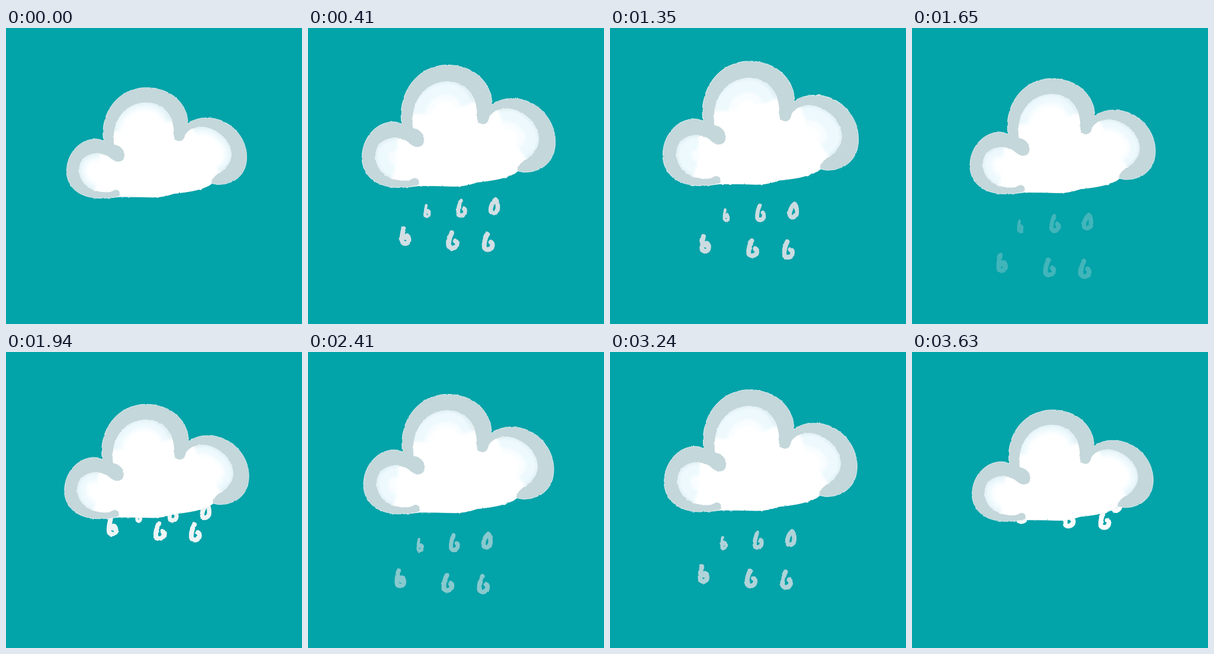
These frames come from a looping animation (500 by 500 pixels, 3.73 s). An HTML page:

```html
<!DOCTYPE html>
<html lang="en">
<head>
<meta charset="utf-8">
<title>Rain cloud</title>
<style>
  html, body { margin: 0; width: 100%; height: 100%; overflow: hidden; background: #02a3a9; }
  svg { display: block; width: 100vw; height: 100vh; }
  .line { fill: none; stroke-linecap: round; stroke-linejoin: round; }
  .shade { fill: none; stroke: #eaf8fd; }
</style>
</head>
<body>
<svg viewBox="0 0 500 500">
  <defs>
    <filter id="rough" filterUnits="userSpaceOnUse" x="0" y="0" width="500" height="500" color-interpolation-filters="sRGB">
      <feTurbulence type="fractalNoise" baseFrequency=".13" numOctaves="2" seed="4"/>
      <feDisplacementMap in="SourceGraphic" scale="3" xChannelSelector="R" yChannelSelector="G"/>
    </filter>
    <filter id="soft" filterUnits="userSpaceOnUse" x="0" y="0" width="500" height="500">
      <feGaussianBlur stdDeviation="2.2"/>
    </filter>
    <path id="outline" d="M89 215C88 181 112 152 143 152Q151 152 157 156C149 103 184 55 235 55
      C279 55 311 83 312 123Q326 112 346 112C388 112 420 147 420 186C420 220 397 238 366 238
      L356 236C341 248 313 252 286 255Q266 262 248 262Q218 261 187 261
      Q168 264 150 264C113 263 90 244 89 215Z"/>
    <path id="inner" d="M185 276L172 262Q188 262 187 255Q186 247 177 248Q169 254 155 252C126 249 112 230 112 210
      C112 187 132 178 150 179Q163 181 172 190Q184 199 193 191Q200 176 186 166L176 162
      C171 116 198 83 236 83C268 84 288 109 286 146Q288 157 297 156Q306 155 307 142Q319 129 338 129
      C367 131 392 157 392 182Q390 203 370 216Q357 224 355 231Q354 238 361 243L362 276Z"/>
    <path id="arcs" d="M140 249C122 243 112 228 112 210C112 187 132 178 150 179
      M175 138C176 107 203 83 236 83C258 84 274 98 281 118
      M322 132Q330 129 338 129C367 131 392 157 392 182Q390 203 370 216"/>
    <clipPath id="inCloud"><use href="#outline"/></clipPath>
    <clipPath id="inside"><use href="#inner"/></clipPath>
    <path id="hook" d="M-1 -13C-4 -8 -7 2 -6 9C-3 14 4 13 7 8Q9 2 5 0"/>
    <path id="bead" d="M-3 -13C-5 -5 -7 4 -5 10C-1 14 6 12 6 5C6 1 3 -3 1 -1V2"/>
    <path id="ring" d="M3 -13C-3 -8 -7 2 -5 8C-1 13 7 9 7 1Q7 -8 4 -12"/>
  </defs>

  <g id="drops" class="line" stroke-width="8" filter="url(#rough)"></g>

  <g id="cloud">
    <g filter="url(#rough)">
      <use href="#outline" fill="#c4d7db" stroke="#e0eeef" stroke-width="1"/>
      <g clip-path="url(#inCloud)">
        <use href="#inner" fill="#fff"/>
        <g clip-path="url(#inside)">
          <g class="shade" filter="url(#soft)">
            <use id="wide" href="#arcs" opacity=".3"/>
            <use id="band" href="#arcs" opacity=".85"/>
            <use href="#arcs" stroke="#cbdce1" stroke-width="5" opacity=".4"/>
          </g>
        </g>
      </g>
    </g>
  </g>
</svg>
<script>
const LOOP = 3730, LAST = 3630, CYCLE = 897, STEP = 530 / 9;
const $ = id => document.getElementById(id);
const clamp = v => Math.max(0, Math.min(1, v));

// [phase in ms, value]
const cloudTop = [[0, 100], [43, 97], [146, 88], [189, 82.3], [326, 69.5], [410, 62],
  [453, 55.5], [475, 54], [530, 61], [897, 100]];
const fall = [[0, -98], [43, -90], [146, -70], [189, -58], [410, -13], [453, 0],
  [530, 9], [693, 26], [860, 46], [897, 46]];

// the two rows fall and drift at their own rates
const upper = { rate: .57, drift: .4 }, lower = { rate: 1, drift: .27 };

// shape, x, y, width scale, height scale, row
const drops = [
  ['bead', 196.5, 316.5, .6, .72, upper],
  ['hook', 254, 312, .85, .97, upper],
  ['ring', 309, 309.5, .95, .97, upper],
  ['bead', 161, 364.5, 1, 1, lower],
  ['hook', 240.5, 372, 1, 1, lower],
  ['hook', 300.5, 374, 1, 1.03, lower]
].map(([shape, x, y, sx, sy, row]) => {
  const el = document.createElementNS('http://www.w3.org/2000/svg', 'use');
  el.setAttribute('href', '#' + shape);
  $('drops').append(el);
  return { el, x, y, sx, sy, row };
});

function at(keys, p) {
  let i = 1;
  while (i < keys.length - 1 && p > keys[i][0]) i++;
  const [p0, a] = keys[i - 1], [p1, b] = keys[i];
  return a + (b - a) * (p - p0) / (p1 - p0);
}

function mix(a, b, k) {
  return `rgb(${a.map((v, i) => Math.round(v + (b[i] - v) * k))})`;
}

function draw(t) {
  const held = t >= LAST ? LAST : Math.min(60, Math.floor((t + 6) / STEP)) * STEP;
  const p = held % CYCLE;

  const top = at(cloudTop, p), u = (100 - top) / 46;
  const sx = (306 + 27 * u) / 333;
  const bottom = 287 - 22 * u;
  const sy = (bottom - top) / 209;
  $('cloud').setAttribute('transform',
    `translate(255 ${bottom}) scale(${sx} ${sy}) translate(-255 -263.2)`);
  $('band').setAttribute('stroke-width', 20 + 30 * u);
  $('wide').setAttribute('stroke-width', 30 + 46 * u);

  const dy = at(fall, p);
  for (const { el, x, y, sx, sy, row } of drops) {
    el.setAttribute('transform',
      `translate(${x - dy * row.drift} ${y + dy * row.rate}) scale(${sx} ${sy})`);
  }
  $('drops').setAttribute('stroke', mix([255, 255, 255], [202, 219, 224], clamp(p / 470)));
  $('drops').setAttribute('opacity', p < 12 ? 0 : clamp((870 - p) / 370));
}

const start = performance.now();
function tick() {
  draw((performance.now() - start) % LOOP);
  requestAnimationFrame(tick);
}
tick();
</script>
</body>
</html>
```
